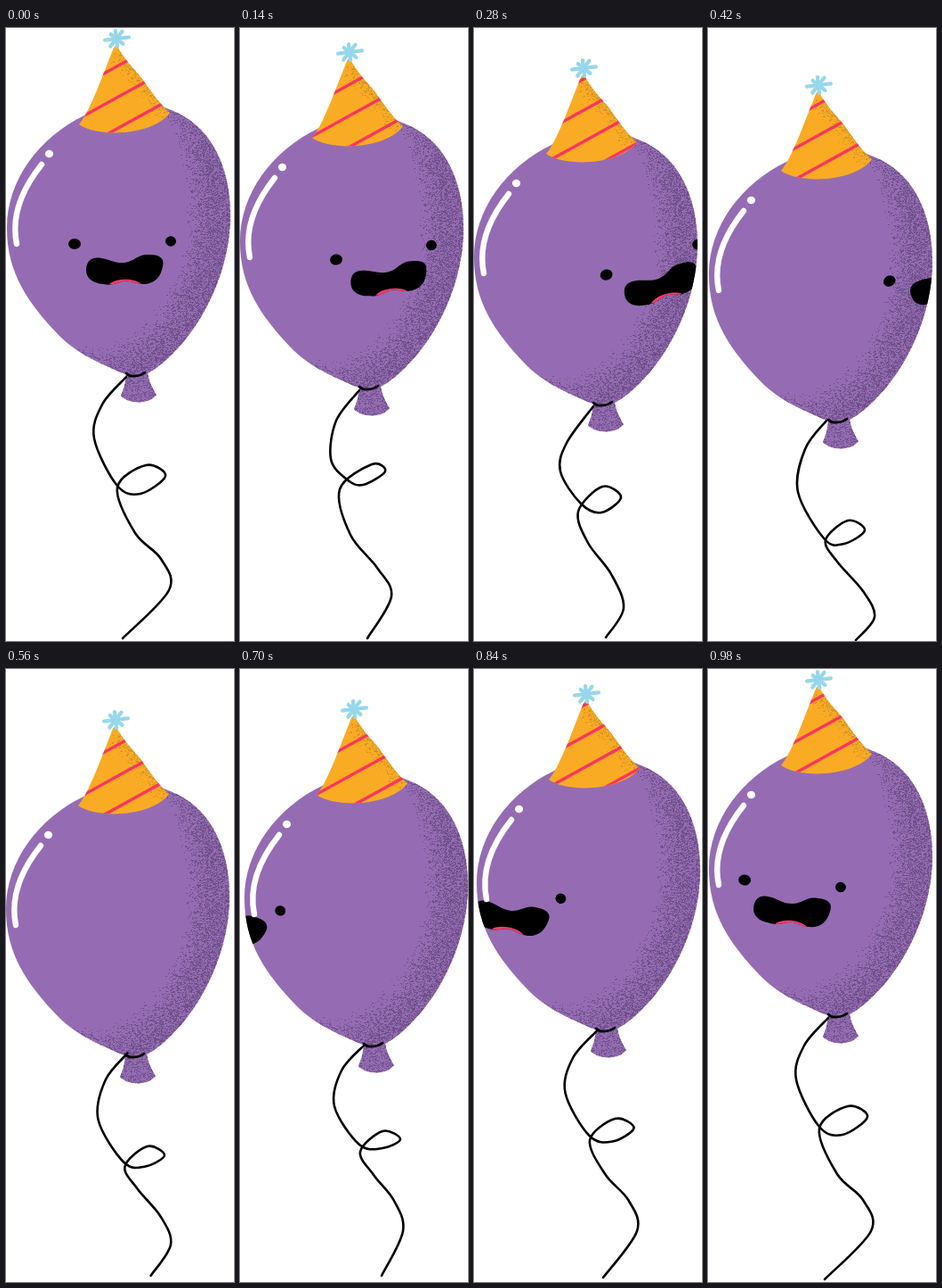
Animation, 256 px wide and 687 px high, one loop 1120 ms. Source, as an HTML page with a canvas:

```html
<!DOCTYPE html>
<html lang="en">
<head>
<meta charset="utf-8">
<title>Party balloon</title>
<style>
  html, body { margin: 0; width: 100%; height: 100%; overflow: hidden; background: #fff; }
  canvas { display: block; width: 256px; height: 687px; }
</style>
</head>
<body>
<canvas id="stage" width="256" height="687"></canvas>
<script>
const W = 256, H = 687, STEP = 140;
const ctx = document.getElementById('stage').getContext('2d');

const body = new Path2D('M134 388C100 374 76 362 58 343C25 308 1 275 1 224C1 170 38 122 88 98C118 80 155 79 183 91C230 108 252 155 252 210C252 270 222 332 186 366C174 378 165 384 157 388Z');
const knot = new Path2D('M135 388C134 398 132 405 129 412C136 421 160 423 169 411C164 403 160 395 159 385Z');
const tie = new Path2D('M135 387Q139 391 144 390Q151 390 156 386');
const hat = new Path2D('M121 22Q124 16 127 24C136 39 145 47 153 57C162 70 173 86 184 95C165 121 103 123 82 108C91 97 96 83 102 70Z');
const shine = new Path2D('M40 153C20 178 5 208 12 242');
const mouth = new Path2D('M-41 31C-41 20 -35 15 -24 17C-15 18 -9 23 2 22C15 20 16 12 30 13C42 13 47 17 45 26C43 38 36 46 23 46C13 46 9 41 0 43C-7 45 -13 48 -22 46C-34 45 -41 39 -41 31Z');
const tongue = new Path2D('M-15 46C-7 39 13 39 21 46C13 49 -6 49 -15 46Z');

// String shapes, as x,y points from the knot down
const swayA = [135,391, 108,422, 99,460, 125,513, 151,522, 179,502, 157,490, 125,515, 145,566, 174,595, 183,630, 131,684];
const swayB = [134,406, 108,440, 102,483, 120,506, 138,512, 163,497, 148,489, 112,517, 124,568, 154,605, 170,637, 143,684];
const swayC = [134,424, 104,465, 97,497, 120,533, 143,543, 165,526, 144,514, 117,542, 128,577, 154,612, 168,650, 148,683];
const swayD = [133,440, 109,472, 101,520, 131,573, 153,578, 176,563, 157,552, 132,574, 145,598, 174,631, 187,660, 166,686];
const swayE = [140,421, 114,450, 106,490, 134,533, 160,537, 180,527, 160,518, 135,541, 150,567, 173,596, 183,630, 159,680];
const between = (a, b) => a.map((v, i) => (v + b[i]) / 2);
const swayDE = between(swayD, swayE);
swayDE[23] = 680;

// dx, dy: balloon offset; band: stripe height; face: x, y, degrees
const poses = [
  { dx: 0,  dy: 0,  band: 40, face: [131, 241, 0],       string: swayA },
  { dx: -1, dy: 15, band: 45, face: [161.5, 252, -7],    string: swayB },
  { dx: -1, dy: 33, band: 56, face: [200, 260, -16.8],   string: swayC },
  { dx: 0,  dy: 52, band: 65, face: [250.5, 256.5, -29], string: swayD },
  { dx: -1, dy: 45, band: 73, face: [-70, 240, 25],      string: swayDE },
  { dx: 4,  dy: 33, band: 81, face: [-7, 257, 17],       string: swayE },
  { dx: 2,  dy: 16, band: 90, face: [44, 249, 11],       string: between(swayE, swayA) },
  { dx: 0,  dy: 0,  band: 99, face: [95, 241, 5.8],      string: swayA }
];

function random(seed) {
  return () => {
    seed = (seed * 1664525 + 1013904223) >>> 0;
    return seed / 4294967296;
  };
}

// Speckled layer; density(x, y) gives the chance of a dot
function grain(color, seed, density) {
  const layer = document.createElement('canvas');
  layer.width = W;
  layer.height = 430;
  const g = layer.getContext('2d');
  const rnd = random(seed);
  g.fillStyle = color;
  for (let y = 0; y < layer.height; y++) {
    for (let x = 0; x < W; x++) {
      if (rnd() < density(x, y)) g.fillRect(x, y, rnd() < 0.3 ? 2 : 1, 1);
    }
  }
  return layer;
}

const clamp = (v, top) => Math.max(0, Math.min(top, v));
const shade = grain('rgba(104,76,130,.8)', 7, (x, y) => {
  if (y > 388) return 0.3;
  const d = Math.hypot((x - 90) / 118, (y - 200) / 165) - 0.95;
  return clamp(d * 1.9, 0.45);
});
const hatShade = grain('rgba(196,140,40,.7)', 21, (x, y) => {
  const edge = 128 + (y - 25) * 0.8;
  return y < 28 || y > 108 ? 0 : clamp(0.4 - (edge - x) / 55, 0.4);
});

function clipped(path, draw) {
  ctx.save();
  ctx.clip(path);
  draw();
  ctx.restore();
}

function fill(path, color) {
  ctx.fillStyle = color;
  ctx.fill(path);
}

function stroke(path, color, width) {
  ctx.strokeStyle = color;
  ctx.lineWidth = width;
  ctx.stroke(path);
}

function line(x1, y1, x2, y2, color, width) {
  const p = new Path2D();
  p.moveTo(x1, y1);
  p.lineTo(x2, y2);
  stroke(p, color, width);
}

function oval(x, y, rx, ry, color) {
  const p = new Path2D();
  p.ellipse(x, y, rx, ry, 0, 0, Math.PI * 2);
  fill(p, color);
}

// Smooth curve through all points
function curve(pts) {
  const p = new Path2D();
  const n = pts.length / 2;
  const at = (i, k) => pts[2 * clamp(i, n - 1) + k];
  p.moveTo(pts[0], pts[1]);
  for (let i = 0; i < n - 1; i++) {
    const c = [0, 1].map(k => at(i, k) + (at(i + 1, k) - at(i - 1, k)) / 6);
    const d = [0, 1].map(k => at(i + 1, k) - (at(i + 2, k) - at(i, k)) / 6);
    p.bezierCurveTo(...c, ...d, at(i + 1, 0), at(i + 1, 1));
  }
  return p;
}

function drawFace([x, y, angle]) {
  ctx.save();
  ctx.translate(x, y);
  ctx.rotate(angle * Math.PI / 180);
  oval(-54, 1, 7, 6, '#000');
  oval(54, -2, 6, 5.7, '#000');
  fill(mouth, '#000');
  clipped(mouth, () => fill(tongue, '#fb3b6a'));
  ctx.restore();
}

function drawHat(band) {
  fill(hat, '#faab24');
  clipped(hat, () => {
    ctx.drawImage(hatShade, 0, 0);
    for (let y = band - 70; y < 160; y += 35) {
      line(70, y + 33, 200, y - 38.5, '#f9365f', 3.4);
    }
  });
  const reach = [15, 10.5, 10, 12, 14, 9, 10, 11.5];
  reach.forEach((r, i) => {
    const a = i * Math.PI / 4 - 0.12;
    line(124, 12, 124 + (r - 1) * Math.cos(a), 12 + (r - 1) * Math.sin(a), '#96d7eb', 4.2);
  });
}

function draw(pose) {
  const { dx, dy, band, face, string } = pose;
  ctx.fillStyle = '#fff';
  ctx.fillRect(0, 0, W, H);
  ctx.lineCap = ctx.lineJoin = 'round';

  ctx.save();
  ctx.translate(dx, dy);
  fill(knot, '#956cb3');
  clipped(knot, () => ctx.drawImage(shade, 0, 0));
  fill(body, '#956cb3');
  clipped(body, () => {
    ctx.drawImage(shade, 0, 0);
    drawFace([face[0] - dx, face[1] - dy, face[2]]);
  });
  stroke(shine, '#fff', 6.4);
  oval(48.5, 141, 4.6, 4.2, '#fff');
  drawHat(band);
  stroke(tie, '#000', 2.8);
  ctx.restore();

  stroke(curve(string), '#000', 2.6);
}

let shown = -1;
const start = performance.now();
function tick() {
  const step = Math.floor((performance.now() - start) / STEP) % poses.length;
  if (step !== shown) {
    shown = step;
    draw(poses[step]);
  }
  requestAnimationFrame(tick);
}
tick();
</script>
</body>
</html>
```
